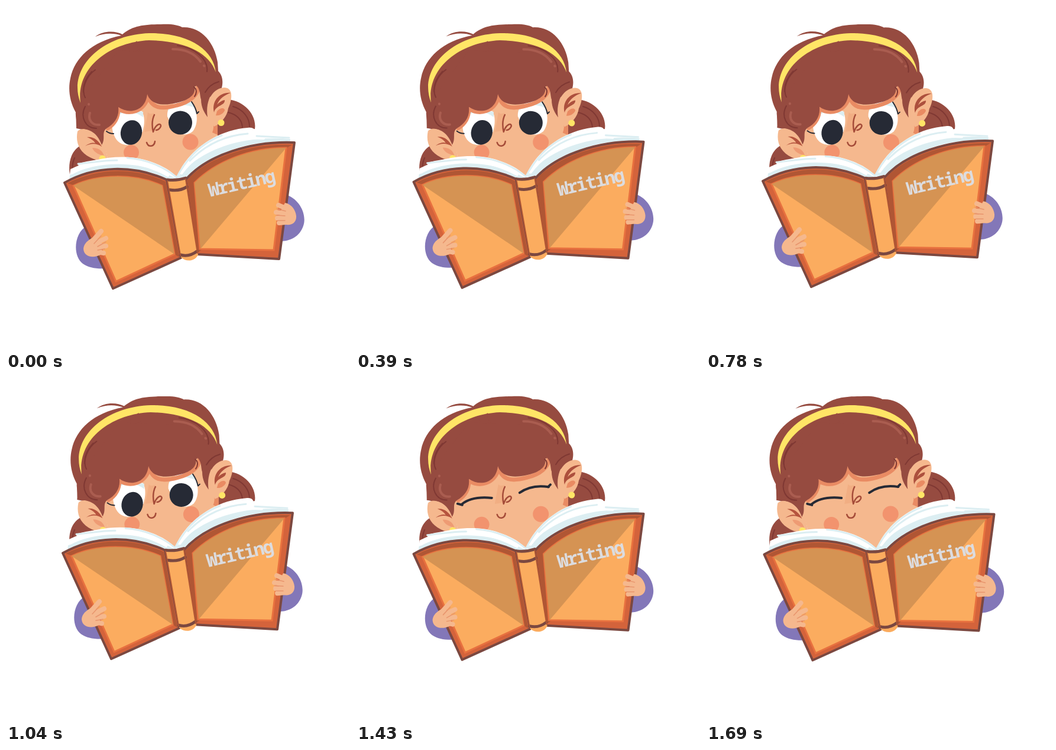
An HTML page for the animation above (1.82 s loop, 582 px wide and 582 px high).

```html
<!DOCTYPE html>
<html lang="en">
<head>
<meta charset="utf-8">
<title>Girl reading</title>
<style>
html, body { margin: 0; width: 100%; height: 100%; overflow: hidden; background: #fff; }
svg { display: block; width: 100vw; height: 100vh; }
.hair { fill: #964b40; }
.skin { fill: #f5b88e; }
.blush { fill: #f2936e; }
.gold { fill: #ffe566; }
.sleeve { fill: #8377b8; }
.edge { fill: #d4633b; stroke: #7b4840; stroke-width: 4; stroke-linejoin: round; }
.fold { fill: #b05634; }
.face { fill: #fbac5f; stroke: #e8713f; stroke-width: 3; }
.shade { fill: #d59353; }
.line { fill: none; stroke-linecap: round; stroke-linejoin: round; }
.dark { stroke: #7f3833; stroke-width: 2; }
.glow { stroke: #aa5d50; stroke-width: 4; }
.brown { stroke: #a54c39; stroke-width: 2.5; }
.ink { stroke: #262a35; stroke-width: 4; }
.page { stroke: #dceef2; stroke-width: 3; }
.finger { stroke: #f5b88e; stroke-width: 8; }
.crease { stroke: #e8956d; stroke-width: 1.5; }
text { font: bold 31px "Noto Sans Mono", monospace; letter-spacing: -2.4px; fill: #dcdcdf; }
</style>
</head>
<body>
<svg viewBox="0 0 582 582">
  <!-- ponytails -->
  <path class="hair" d="M360 158C397 153 425 181 421 208L350 222ZM126 236C109 246 105 267 108 285L170 266Z"/>
  <path class="line dark" d="M384 170C402 175 412 190 412 204M376 180C392 184 399 194 400 205M116 257C113 264 112 272 113 277"/>

  <g id="head">
    <path class="hair" d="M119 207C121 195 117 186 118 180C107 160 105 140 109 122C116 88 145 60 195 50C184 46 167 45 151 52C165 41 185 42 197 48C212 35 230 31 262 31C279 30 291 32 298 36C330 34 353 62 358 95L359 110C367 118 368 130 364 142L345 190L160 215Z"/>
    <path class="skin" d="M160 205L192 165L325 135L358 165L358 225L290 293L172 258Z"/>
    <path d="M339 176L358 190V218L349 214C354 203 350 190 339 176Z" fill="#e98b63"/>
    <path class="skin" d="M121 212C116 236 129 256 160 262L172 258L165 221C150 213 130 202 121 212Z"/>
    <path d="M137 222C147 220 157 227 162 238C153 232 144 232 134 237C142 231 148 231 151 232C148 227 143 224 137 222Z" fill="#b5543e"/>
    <path d="M146 240C158 240 164 246 166 254C160 252 149 249 146 240Z" fill="#ee9b74"/>
    <path class="skin" d="M341 186C336 161 351 138 370 138C386 139 382 161 376 173C374 188 363 199 352 204Z"/>
    <path d="M380 147C362 145 347 161 352 180C355 167 371 169 370 159C365 160 360 163 357 167C361 157 369 151 380 147Z" fill="#ad503d"/>
    <path d="M357 178C364 170 371 173 370 177C367 183 360 186 355 185Z" fill="#e98b63"/>
    <circle class="gold" cx="364" cy="197.500" r="5.500"/>
    <circle class="gold" cx="163" cy="258" r="5.500"/>

    <circle class="blush" cx="212" cy="248" r="13"/>
    <circle class="blush" cx="312" cy="230" r="13.500"/>

    <g id="open">
      <path d="M190 171C181 184 176 204 183 219C188 232 199 236 209 235L231 213C235 199 235 187 230 178Z" fill="#fff"/>
      <path d="M190 173L232 179L232 188C219 178 202 176 187 186Z" fill="#dceef2"/>
      <ellipse cx="212" cy="214" rx="18" ry="21" transform="rotate(14 212 214)" fill="#262a35"/>
      <path d="M273 187C271 168 289 158 312 161C324 174 327 198 316 212C307 220 293 218 285 212Z" fill="#fff"/>
      <path d="M273 178C281 164 299 159 313 162L319 172C303 165 286 166 273 178Z" fill="#dceef2"/>
      <ellipse cx="295" cy="197.500" rx="20" ry="20" fill="#262a35"/>
      <path class="line" d="M170 212Q175 216 182 216M314 162Q321 172 323 182L326 179" stroke="#262a35" stroke-width="2"/>
    </g>
    <g id="closed">
      <path class="line ink" d="M178 214C191 203 208 201 229 203M276 194C290 184 306 181 325 184"/>
      <path class="line ink" d="M171 213L179 215M324 184L328 180" stroke-width="3"/>
    </g>

    <path class="line" d="M172 207C185 199 190 187 190 174C208 185 233 180 241 152C246 174 264 175 289 168C310 163 326 150 325 136" stroke="#e98b63" stroke-width="7"/>
    <path d="M240 180C245 185 248 180 251 182L247 211L234 213Z" fill="#efa67c" opacity=".6"/>
    <path class="line brown" d="M251 184C246 194 247 204 249 213C253 200 262 197 262 203C261 207 257 210 254 210"/>
    <path class="line brown" d="M238 231C241 240 251 238 252 229" stroke-width="2"/>

    <!-- fringe -->
    <path class="hair" d="M119 207C138 207 153 211 162 235C169 224 161 214 170 207C184 199 192 187 190 171C209 184 236 178 239 149C245 168 267 169 288 164C310 160 327 147 316 131C330 137 327 149 330 158C330 172 336 181 341 188C338 170 343 152 353 142L365 133C368 119 350 103 330 80L190 75L118 170Z"/>
    <path class="line dark" d="M290 67C318 70 343 89 340 111M151 108C135 119 127 142 134 155M134 170C125 187 134 207 153 207M318 137C324 142 322 149 319 153M337 146C343 135 353 130 360 128M145 111C133 124 130 137 131 146"/>
    <path class="line glow" d="M282 73C303 73 319 80 329 94M142 181C138 194 147 202 158 201M335 101L335.500 101.500M140 166L140 166.500"/>
    <path class="gold" d="M126 164C103 105 162 49 242 46C310 45 351 74 355 112C344 79 303 59 242 58C176 61 118 104 126 164Z"/>
    <path class="hair" d="M195 70C202 63 211 63 217 67C216 64 218 61 222 59C220 64 221 69 226 75L208 78C211 72 207 67 195 70Z"/>
  </g>

  <g id="book">
    <path class="sleeve" d="M137 372C115 383 112 423 130 436C140 443 153 445 170 444ZM476 320C499 329 509 355 503 372C497 390 481 398 464 398Z"/>

    <!-- pages -->
    <path d="M107 294L109 276C150 255 205 249 244 263C268 271 282 281 289 290C301 255 346 211 409 206C424 204 422 215 422 219Q455 219 481 224L482 236L306 297H272L240 288Z" fill="#fff"/>
    <path d="M108 286C155 262 225 259 288 292L270 295C220 270 160 272 107 294ZM290 290C320 252 385 217 481 225V231C410 225 345 250 305 293Z" fill="#dceef2"/>
    <path class="line" d="M111 283C158 258 220 256 274 287M124 268C174 255 225 258 281 286M297 283C326 244 374 221 436 224M303 270C330 239 370 217 416 214" stroke="#fff" stroke-width="4"/>
    <path class="line page" d="M122 267C145 265 164 261 188 261M205 257C238 259 269 273 289 290C306 257 331 232 365 219M311 262C338 234 371 219 409 216M424 220L479 223" stroke-width="2"/>

    <!-- left cover -->
    <path class="edge" d="M99 299C150 270 214 268 272 294L296 426L181 478Z"/>
    <path class="fold" d="M104 300C155 274 216 272 270 297L293 425L282 418L263 305C218 284 158 284 114 303Z"/>
    <path class="face" d="M114 304C155 284 218 283 264 304L285 420L186 466Z"/>
    <path class="shade" d="M114 304C155 284 218 283 264 304L285 420Z"/>

    <!-- right cover -->
    <path class="edge" d="M304 294C340 252 415 228 488 231L462 428L323 420Z"/>
    <path class="fold" d="M306 294C345 254 415 232 484 235L475 240C412 240 354 264 320 299L331 412L324 418Z"/>
    <path class="face" d="M319 299C354 264 412 240 474 240L453 413L328 411Z"/>
    <path class="shade" d="M319 299C354 264 412 240 474 240L329 411Z"/>
    <text transform="translate(345 323) rotate(-13)">Writing</text>

    <!-- spine -->
    <path d="M273 296Q289 297 303 290L325 421C319 433 304 433 296 425Z" fill="#fbac5f"/>
    <path class="line" d="M273 294Q289 296 304 291M277 311Q293 314 306 306M295 421Q310 425 323 415" stroke="#7b4840" stroke-width="5"/>
    <path class="line" d="M273 296L295 422M304 293L324 418" stroke="#b05634" stroke-width="2"/>

    <!-- hands -->
    <path class="skin" d="M131 411C132 399 144 393 151 390L164 403L160 421C148 427 132 425 131 411ZM472 333C483 335 490 345 491 355C492 368 481 373 470 369L463 350Z"/>
    <path class="line finger" d="M146 398L161 381M152 401L169 393M152 408L169 406M152 415L165 418M475 343L461 337M473 351L457 349M473 359L459 359M473 366L462 367" stroke-width="7"/>
    <path class="line crease" d="M149 402L161 389M155 407L169 399M155 413L167 411M473 347L458 343M472 355L457 354M472 363L460 363"/>
  </g>
</svg>
<script>
const LOOP = 1820, STEP = 130, BLINK = 1300;
const $ = id => document.getElementById(id);

function draw(now) {
  const t = Math.floor(now % LOOP / STEP) * STEP;
  const sway = 1 - Math.abs(1 - 2 * t / LOOP);
  const blink = t >= BLINK;
  $("head").setAttribute("transform", `rotate(${0.55 * sway} 250 400)`);
  $("book").setAttribute("transform", `translate(${-3.5 * sway} ${-3.2 * sway})`);
  $("open").style.display = blink ? "none" : "";
  $("closed").style.display = blink ? "" : "none";
}

const start = performance.now();
function tick() {
  draw(performance.now() - start);
  requestAnimationFrame(tick);
}
tick();
</script>
</body>
</html>
```
